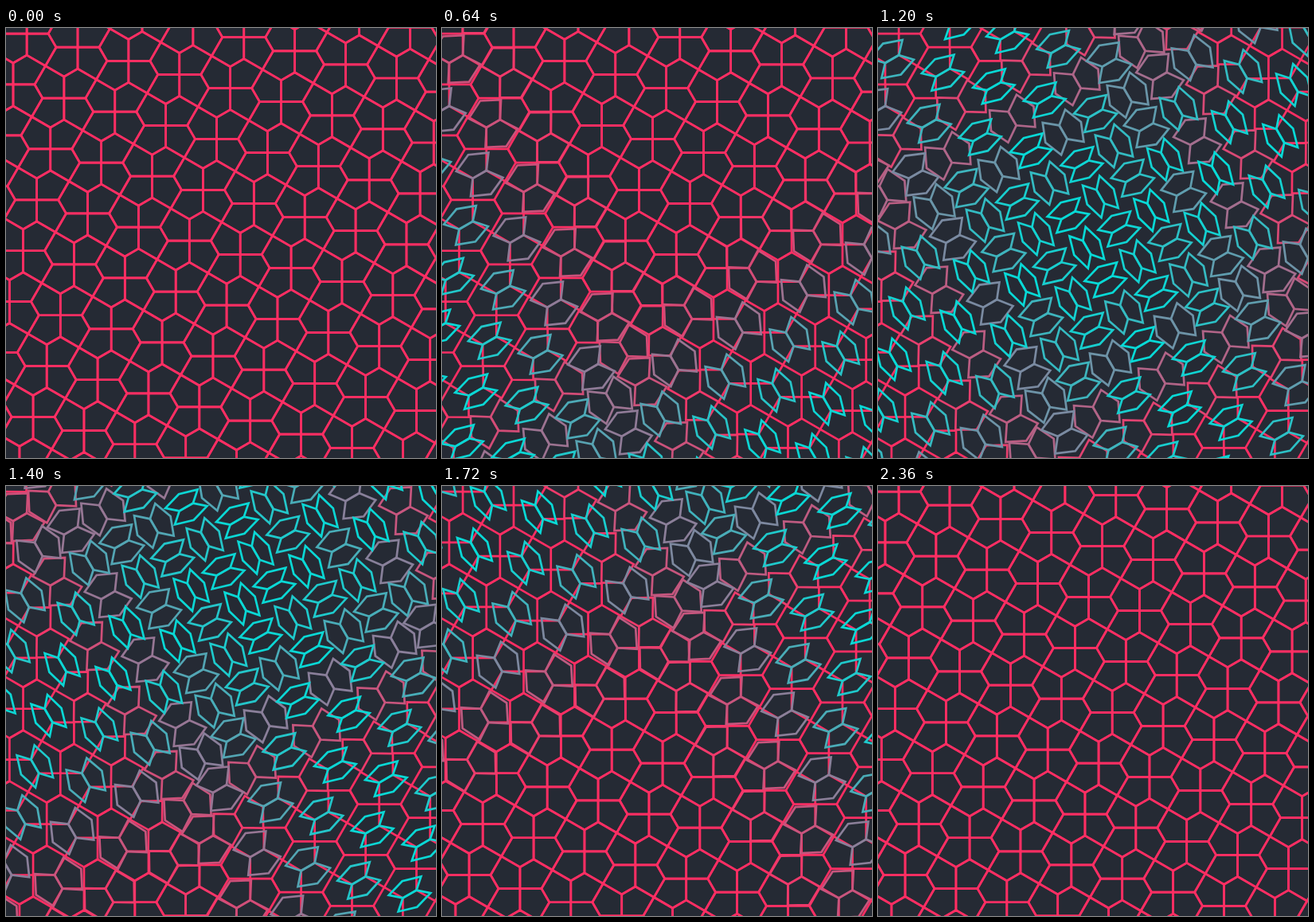
Recreate the animation shown at these times as an HTML page with a canvas. Size 540x540 px, loop 2400 ms.

```html
<!DOCTYPE html>
<html lang="en">
<head>
<meta charset="utf-8">
<title>Pentagon tiling</title>
<style>
html, body { margin: 0; width: 100%; height: 100%; overflow: hidden; background: #252a34; }
canvas { display: block; }
</style>
</head>
<body>
<canvas id="stage" width="540" height="540"></canvas>
<script>
const ctx = document.getElementById('stage').getContext('2d');
const SIZE = 540, LOOP = 2400, STEP = 40;
const EDGE = 27, CELL = EDGE * Math.sqrt(6), TILT = Math.PI / 12;
const SPEED = 0.56, REACH = 312, SQUASH = 0.5;
const RED = [255, 46, 99], CYAN = [8, 217, 214];

// Half of a pair: the shared side lies on the y axis, the tip points along x.
const H = EDGE * (Math.sqrt(3) - 1) / 2, C = EDGE * Math.sqrt(3) / 2;
const PENTAGON = [[0, -H], [C, -C], [C + EDGE / 2, 0], [C, C], [0, H]];

const ux = CELL * Math.cos(TILT), uy = CELL * Math.sin(TILT);
const pairs = [];
for (let i = -8; i <= 8; i++) {
  for (let j = -8; j <= 8; j++) {
    const x = 230.3 + i * ux + j * uy, y = 267.2 + i * uy - j * ux;
    addPair(x + ux / 2, y + uy / 2, -Math.PI / 6);
    addPair(x + uy / 2, y - ux / 2, Math.PI / 3);
  }
}

// The wave of each family runs along its shared sides.
function addPair(x, y, angle) {
  const dx = Math.sin(angle), dy = -Math.cos(angle);
  pairs.push({ x, y, angle, along: (x - SIZE / 2) * dx + (y - SIZE / 2) * dy });
}

function ease(u) {
  return u < 0.5 ? 2 * u * u : 1 - 2 * (1 - u) * (1 - u);
}

function drawPair({ x, y, angle, p }) {
  const cos = Math.cos(angle), sin = Math.sin(angle), scale = 1 - SQUASH * p;
  ctx.strokeStyle = `rgb(${RED.map((v, k) => Math.round(v + (CYAN[k] - v) * p))})`;
  for (const side of [1, -1]) {
    ctx.beginPath();
    for (const [a, b] of PENTAGON) {
      const px = a * scale * side, py = b * side;
      ctx.lineTo(x + px * cos - py * sin, y + px * sin + py * cos);
    }
    ctx.closePath();
    ctx.stroke();
  }
}

function draw(now) {
  const t = Math.floor(now % LOOP / STEP) * STEP;
  const crest = (t - LOOP / 2) * SPEED;
  ctx.fillStyle = '#252a34';
  ctx.fillRect(0, 0, SIZE, SIZE);
  ctx.lineWidth = 2.7;
  for (const pair of pairs) {
    pair.p = ease(Math.max(0, 1 - Math.abs(pair.along - crest) / REACH));
  }
  pairs.sort((a, b) => a.p - b.p).forEach(drawPair);
}

const start = performance.now();
function tick() {
  draw(performance.now() - start);
  requestAnimationFrame(tick);
}
tick();
</script>
</body>
</html>
```
